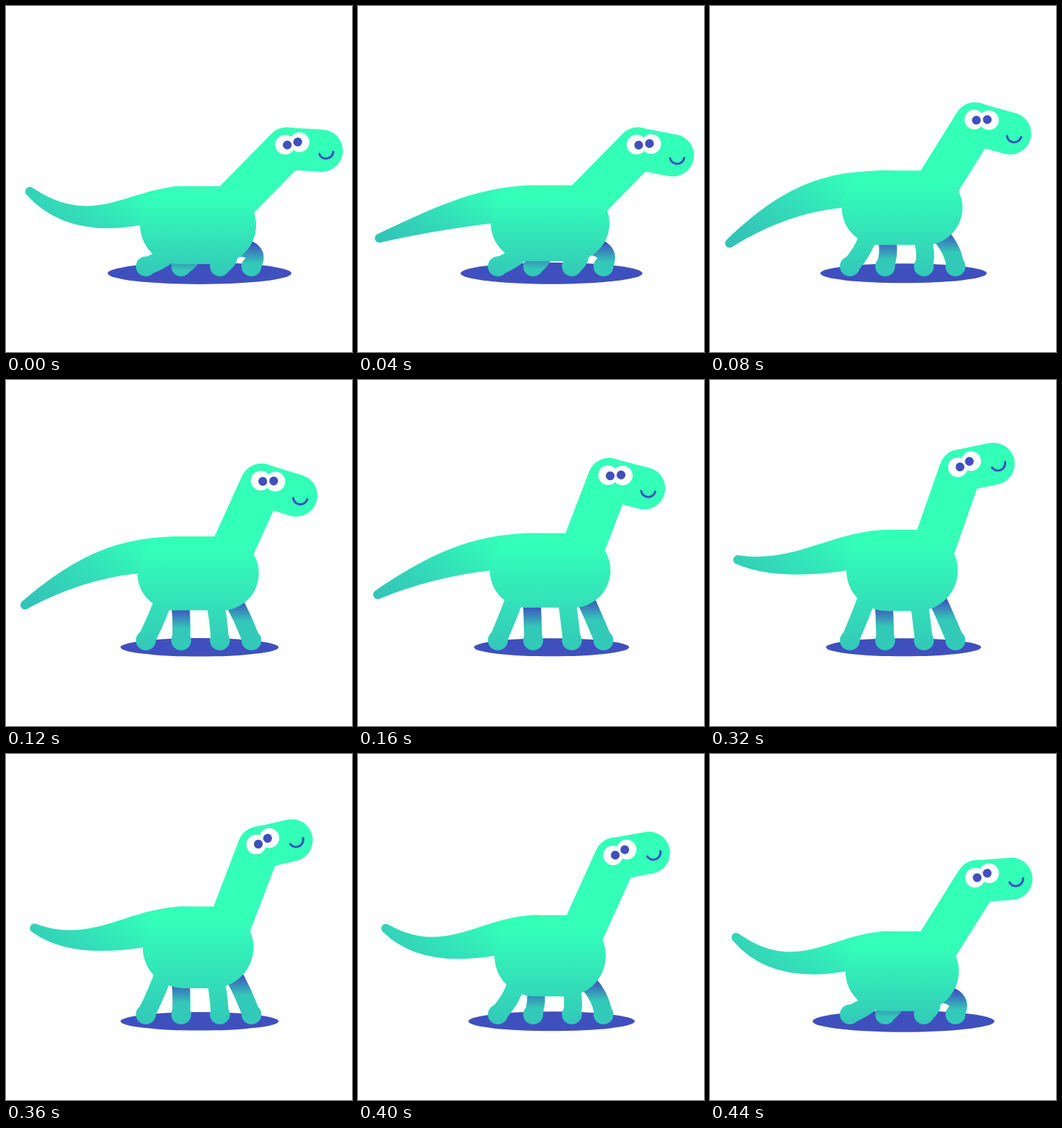
These frames come from a looping animation (480x480 px, 480 ms). An HTML page with a canvas:

```html
<!DOCTYPE html>
<html lang="en">
<head>
<meta charset="utf-8">
<title>Bouncing dinosaur</title>
<style>
  html, body { margin: 0; width: 100%; height: 100%; overflow: hidden; background: #fff; }
  canvas { display: block; width: 480px; height: 480px; }
</style>
</head>
<body>
<canvas id="stage" width="480" height="480"></canvas>
<script>
const ctx = document.getElementById('stage').getContext('2d');
const { PI, sin, cos, atan2, abs, pow } = Math;
const STEP = 40, STEPS = 12;
const BLUE = '#3f50be', MINT = '#33ffb9', TEAL = '#33c8b8';

// cubic-bezier(.5, 0, 0, 1), solved by bisection.
function ease(x) {
  let lo = 0, hi = 1;
  for (let i = 0; i < 24; i++) {
    const s = (lo + hi) / 2;
    if (1.5 * s * (1 - s) * (1 - s) + s * s * s < x) lo = s; else hi = s;
  }
  return lo * lo * (3 - 2 * lo);
}

// Soft periodic peak of height 1 around the given step.
function peak(step, at, width) {
  const d = STEPS / PI * sin(PI * (step - at) / STEPS);
  return 1 / (1 + d * d / (width * width));
}

// Slow rise and fast fall, like a rounded sawtooth.
function whip(step, at) {
  const a = 2 * PI * (step - at) / STEPS;
  return atan2(0.8 * sin(a), 1 + 0.8 * cos(a));
}

function poseAt(step) {
  const turn = 2 * PI * step / STEPS;
  const crouch = 1 - ease(1 - abs(step * 2 / STEPS - 1));
  const stretch = -sin(turn);
  const mid = 262 + 42 * crouch;
  const height = 108 + 5.3 * stretch, width = 161 - 7.4 * stretch;
  const top = mid - height / 2, left = 266.5 - width / 2;

  const neck = 116.5 + 4 * stretch;
  const lean = (13.5 + 34 * peak(step, 0.5, 1.6)) * PI / 180;
  const nape = { x: 308 + neck * sin(lean), y: top + 31 - neck * cos(lean) };
  const nod = (2 + 15 * sin(turn + 0.09)) * PI / 180;

  return { crouch, stretch, mid, height, width, top, left, nape, nod,
           head: 48.5 - 2 * stretch, wag: whip(step, 6.8) };
}

function ramp(x0, y0, x1, y1, from, to) {
  const g = ctx.createLinearGradient(x0, y0, x1, y1);
  g.addColorStop(0, from);
  g.addColorStop(1, to);
  return g;
}

function dot(x, y, r, fill) {
  ctx.fillStyle = fill;
  ctx.beginPath();
  ctx.arc(x, y, r, 0, 7);
  ctx.fill();
}

function line(x0, y0, x1, y1, width, paint) {
  ctx.strokeStyle = paint;
  ctx.lineWidth = width;
  ctx.beginPath();
  ctx.moveTo(x0, y0);
  ctx.lineTo(x1, y1);
  ctx.stroke();
}

function shadow(p) {
  ctx.fillStyle = BLUE;
  ctx.beginPath();
  ctx.ellipse(268.5, 370.8, 106.5 + 21 * p.crouch, 12.4 + 2.7 * p.crouch, 0, 0, 7);
  ctx.fill();
}

function leg(p, foot, hip, lift, paint) {
  const hipY = p.mid + 30, bend = pow(p.crouch, 1.3);
  ctx.strokeStyle = paint;
  ctx.lineWidth = 24.8;
  ctx.beginPath();
  ctx.moveTo(foot, 361.5);
  ctx.quadraticCurveTo((foot + hip) / 2 + 32 * bend, (361.5 + hipY) / 2 - lift * bend, hip, hipY);
  ctx.stroke();
  dot(foot, 361.3, 13.8, paint);
}

function backLeg(p, foot, hip, lift, shade) {
  const y = p.mid + shade - 16 * p.crouch;
  leg(p, foot, hip, lift, ramp(0, y, 0, y + 28, BLUE, '#33c9b8'));
}

function tail(p, paint) {
  const { wag, mid } = p;
  const x = 33 + 6.5 * p.stretch, y = mid - 53 * wag, a = 1.52 + 0.87 * wag, r = 6.3;
  ctx.fillStyle = paint;
  ctx.beginPath();
  ctx.moveTo(250, p.top);
  ctx.bezierCurveTo(170, p.top, 117 + 8 * wag, mid - 16 + 25 * wag, x - r * cos(a), y - r * sin(a));
  ctx.arc(x, y, r, a + PI, a, true);
  ctx.quadraticCurveTo(95 - 13 * wag, mid + 13 + 6 * wag, p.left + 1, mid);
  ctx.lineTo(250, mid);
  ctx.fill();
}

function body(p, paint) {
  tail(p, paint);
  tail(p, ramp(205, 0, 30, 0, 'rgba(52,165,184,0)', 'rgba(52,165,184,.5)'));
  ctx.fillStyle = paint;
  ctx.beginPath();
  ctx.roundRect(p.left, p.top, p.width, p.height, p.height / 2);
  ctx.fill();
  line(308, p.top + 31, p.nape.x, p.nape.y, 59.5, paint);
}

function head(p) {
  ctx.save();
  ctx.translate(p.nape.x, p.nape.y);
  ctx.rotate(p.nod);
  line(0, 0, p.head, 0, 58.5, MINT);
  dot(-2.8, -5.3, 13.7, '#fff');
  dot(17, -9.9, 13.7, '#fff');
  dot(0.2, -5.1, 6.1, BLUE);
  dot(14.5, -10.1, 6.1, BLUE);
  ctx.strokeStyle = BLUE;
  ctx.lineWidth = 3;
  ctx.beginPath();
  ctx.arc(p.head + 6, 0.6, 10, 0, 2.72);
  ctx.stroke();
  ctx.restore();
}

function draw(step) {
  const p = poseAt(step);
  const skin = ramp(0, p.top + 18, 0, 375, MINT, TEAL);
  ctx.fillStyle = '#fff';
  ctx.fillRect(0, 0, 480, 480);
  ctx.lineCap = 'round';
  shadow(p);
  backLeg(p, 243, 240.5, 4, 51);
  backLeg(p, 340.5, 311, 13, 41);
  body(p, skin);
  leg(p, 194, 221, 4, skin);
  leg(p, 296.7, 288, 4, skin);
  head(p);
}

const start = performance.now();
let shown = -1;
function tick() {
  const step = Math.floor((performance.now() - start) / STEP) % STEPS;
  if (step !== shown) draw(shown = step);
  requestAnimationFrame(tick);
}
tick();
</script>
</body>
</html>
```
